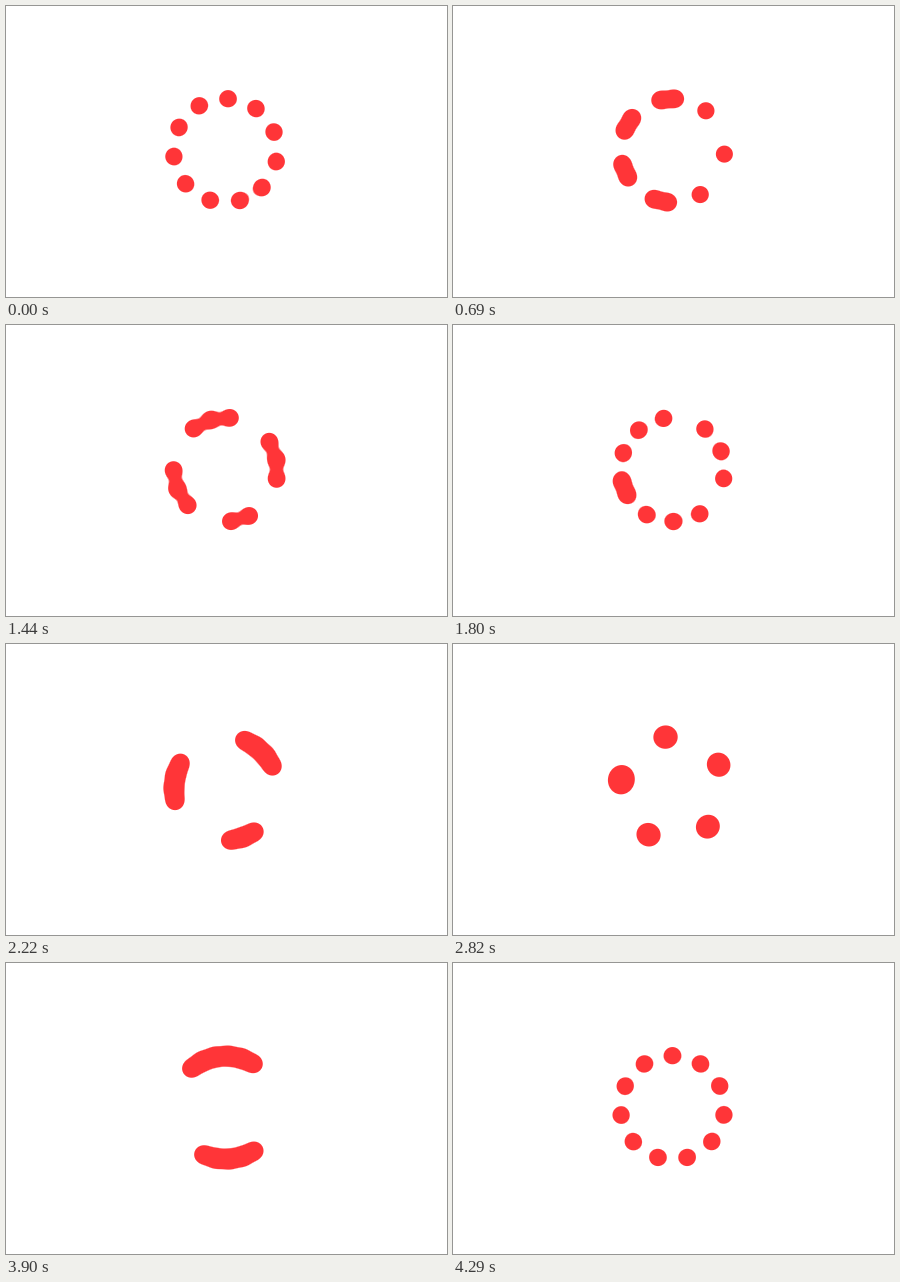
Recreate the animation shown at these times as an HTML page with a canvas. Size 441 px wide and 291 px high, loop 4320 ms.

```html
<!DOCTYPE html>
<html lang="en">
<head>
<meta charset="utf-8">
<title>Gooey loader</title>
<style>
  html, body { margin: 0; width: 100%; height: 100%; overflow: hidden; background: #fff; }
  canvas { display: block; }
</style>
</head>
<body>
<canvas id="stage" width="441" height="291"></canvas>
<script>
const LOOP = 4320, STEP = 30;
const COUNT = 11, CX = 219.5, CY = 144.6, RING = 52;
const DOT = 8.5, FALLOFF = 0.21;
const RGB = [255, 53, 56];
const BOX = { x: 140, y: 66, w: 160, h: 158 };

const SLICE = 360 / COUNT;
const ANCHOR = 4 * SLICE;
const EDGE_SPEED = 0.013;

// [ms, degrees added to the spacing between neighbours]
const KNOTS = [
  [0, 0.4], [690, 21.1], [1440, 62.7], [1650, 71.2], [2220, 92.2],
  [2820, 112.1], [3480, 138.5], [3780, 150.8], [LOOP, 0.4 + 5 * SLICE]
];

const rate = i => (KNOTS[i + 1][1] - KNOTS[i][1]) / (KNOTS[i + 1][0] - KNOTS[i][0]);
const span = i => KNOTS[i + 1][0] - KNOTS[i][0];
const speeds = KNOTS.map((_, i) => {
  if (i === 0 || i === KNOTS.length - 1) return EDGE_SPEED;
  const a = span(i - 1), b = span(i);
  return (b * rate(i - 1) + a * rate(i)) / (a + b);
});

// Cubic Hermite curve through the knots
function spread(t) {
  let i = 0;
  while (i < KNOTS.length - 2 && t >= KNOTS[i + 1][0]) i++;
  const h = span(i), u = (t - KNOTS[i][0]) / h, v = 1 - u;
  return KNOTS[i][1] * (1 + 2 * u) * v * v + speeds[i] * h * u * v * v +
         KNOTS[i + 1][1] * u * u * (3 - 2 * u) - speeds[i + 1] * h * u * u * v;
}

function dotsAt(t) {
  const gap = SLICE + spread(t);
  return Array.from({ length: COUNT }, (_, k) => {
    const a = (ANCHOR + (k + 1) * gap) * Math.PI / 180;
    return [CX + RING * Math.sin(a), CY - RING * Math.cos(a)];
  });
}

const ctx = document.getElementById('stage').getContext('2d');
const image = ctx.createImageData(BOX.w, BOX.h);

function draw(t) {
  const dots = dotsAt(t), data = image.data;
  let p = 0;
  for (let y = 0; y < BOX.h; y++) {
    for (let x = 0; x < BOX.w; x++) {
      const px = BOX.x + x + 0.5, py = BOX.y + y + 0.5;
      let field = 0;
      for (const [dx, dy] of dots) {
        const d = Math.sqrt((px - dx) ** 2 + (py - dy) ** 2);
        field += Math.exp(FALLOFF * (DOT - d));
      }
      // The log of the field is close to the distance from the outline
      const cover = Math.min(1, Math.max(0, 0.5 + Math.log(field) / FALLOFF));
      for (const c of RGB) data[p++] = 255 + (c - 255) * cover;
      data[p++] = 255;
    }
  }
  ctx.putImageData(image, BOX.x, BOX.y);
}

let shown = -1;
function tick() {
  const t = Math.floor((performance.now() % LOOP) / STEP) * STEP;
  if (t !== shown) draw(shown = t);
  requestAnimationFrame(tick);
}
tick();
</script>
</body>
</html>
```
